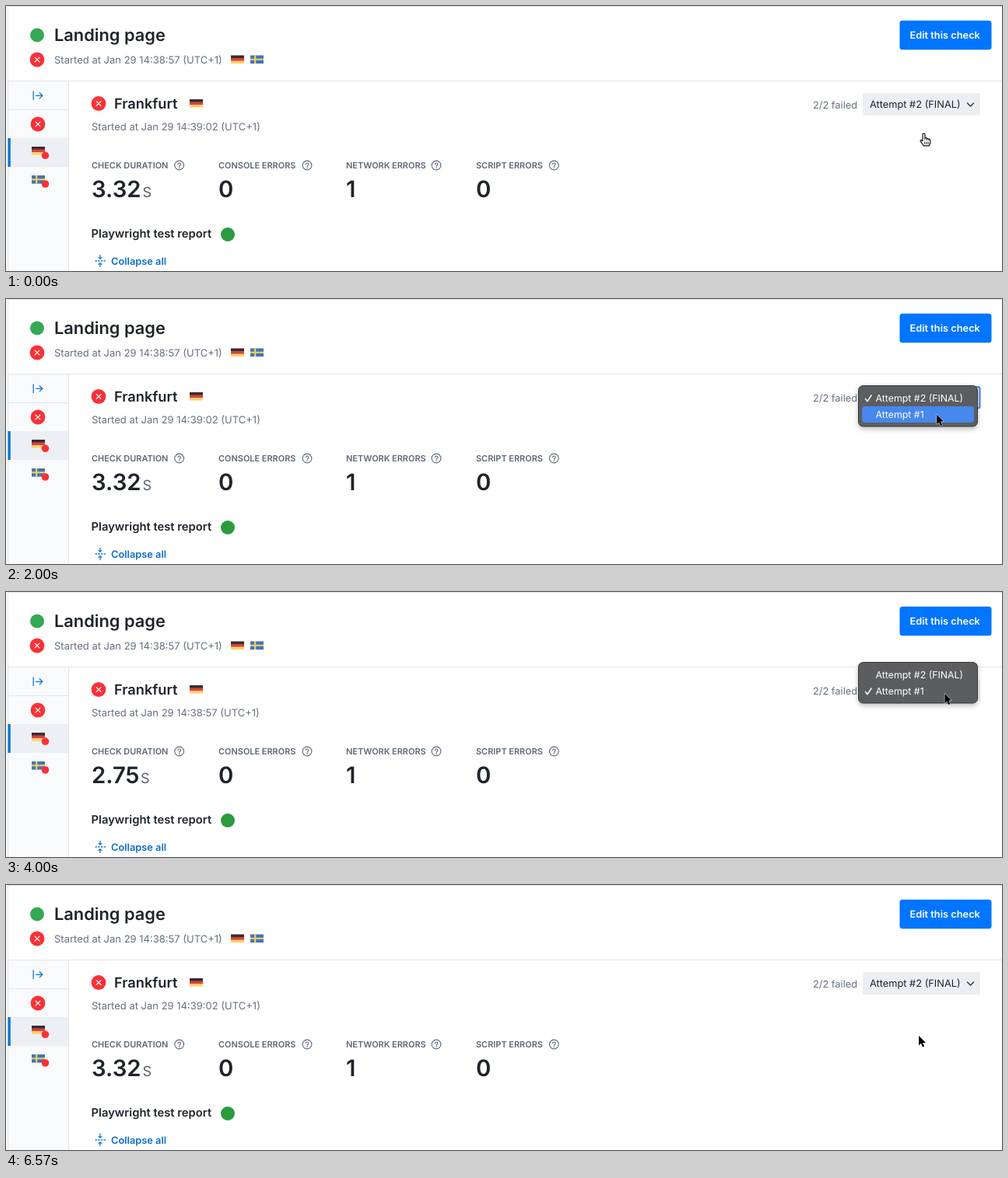
Recreate the animation shown at these times as an HTML page. Size 1280 by 341 pixels, loop 6.86 s.

```html
<!DOCTYPE html>
<html lang="en">
<head>
<meta charset="utf-8">
<title>Check result attempts</title>
<style>
  html, body { margin: 0; width: 100%; height: 100%; overflow: hidden; background: #fff; }
  svg { display: block; width: 100%; height: 100%; }
  text { font-family: Inter, "Open Sans", sans-serif; font-size: 12.8px; fill: #1f242c; white-space: pre; text-rendering: geometricPrecision; }
  .semi { font-weight: 600; }
  .muted { fill: #667080; }
  .date { font-size: 13px; }
  .title { font-size: 21.8px; }
  .city { font-size: 18.2px; }
  .heading { font-size: 14.8px; }
  .label { font-size: 10.95px; font-weight: 600; fill: #5d6878; }
  .number { font-size: 29.3px; font-weight: 600; }
  .unit { font-size: 18.1px; fill: #565f6d; }
  .line { stroke: #e1e5ea; fill: none; }
  .blue { stroke: #0b78d8; fill: none; stroke-width: 1.3; stroke-linecap: round; stroke-linejoin: round; }
  .menu text { font-size: 12.35px; fill: #fff; }
</style>
</head>
<body>
<svg viewBox="0 0 1280 341" preserveAspectRatio="none">
  <defs>
    <g id="fail">
      <circle r="9.4" fill="#fa3136"/>
      <path d="M-2.9-2.9l5.8 5.8M2.9-2.9l-5.8 5.8" stroke="#fff" stroke-width="1.3" stroke-linecap="round"/>
    </g>
    <g id="germany">
      <rect width="17" height="4" fill="#332f30"/>
      <rect y="3.5" width="17" height="4" fill="#dc4040"/>
      <rect y="7.1" width="17" height="3.5" fill="#f8d46a"/>
    </g>
    <g id="sweden">
      <rect width="17" height="10.6" fill="#4474b8"/>
      <path d="M6.2 0v10.6M0 5.3h17" stroke="#f3d35c" stroke-width="2.1"/>
    </g>
    <g id="help">
      <circle r="5.9" fill="none" stroke="#5d6878" stroke-width="1.1"/>
      <path d="M-1.7-1.2c0-2.4 3.5-2.3 3.5 0C1.8.2 0 .2 0 1.6" fill="none" stroke="#5d6878" stroke-width="1.1" stroke-linecap="round"/>
      <circle cy="3.3" r=".75" fill="#5d6878"/>
    </g>
    <path id="tick" d="M0 .5l2.6 3.2L7.6-4" fill="none" stroke="#fff" stroke-width="1.5" stroke-linecap="round" stroke-linejoin="round"/>
    <filter id="shadow" x="-20%" y="-30%" width="140%" height="180%">
      <feDropShadow dx="0" dy="3" stdDeviation="3" flood-opacity=".25"/>
    </filter>
  </defs>

  <rect width="1280" height="341" fill="#fff"/>
  <rect x="3" y="97" width="77" height="244" fill="#f9fafc"/>
  <rect x="3" y="170" width="77" height="37" fill="#eceff4"/>
  <path class="line" d="M2.5 0V341M2 .5H1280M3 96.5H1280M3 133.5H80M80.5 97V341"/>
  <rect x="2.4" y="170" width="3.4" height="37" fill="#0b78d8"/>

  <circle cx="40" cy="37.5" r="9" fill="#34a853"/>
  <text class="semi title" x="62" y="45">Landing page</text>
  <use href="#fail" x="40" y="69"/>
  <text class="muted date" x="62" y="73.5">Started at Jan 29 14:38:57 (UTC+1)</text>
  <use href="#germany" x="289" y="63.5"/>
  <use href="#sweden" x="314" y="63.5"/>
  <rect x="1148.5" y="18.8" width="118" height="37.4" rx="3.5" fill="#0075ff"/>
  <text class="semi" x="1161.5" y="42.3" style="fill:#fff">Edit this check</text>

  <path class="blue" d="M35.2 110v10.5M38.5 115.3h8.2M43.2 111.7l3.6 3.6-3.6 3.6"/>
  <use href="#fail" x="41" y="152"/>
  <use href="#germany" x="33" y="181"/>
  <circle cx="50.5" cy="192.3" r="4.8" fill="#fa3136"/>
  <use href="#sweden" x="33" y="218"/>
  <circle cx="50.5" cy="229" r="4.8" fill="#fa3136"/>

  <use href="#fail" x="119" y="125.5"/>
  <text class="semi city" x="139" y="132.3">Frankfurt</text>
  <use href="#germany" x="236" y="120"/>
  <text class="muted date" x="110" y="160.4" id="started"></text>

  <g id="stats"></g>
  <text class="number" x="110" y="246" id="duration"></text>
  <text class="unit" y="246" id="unit">S</text>

  <text class="semi heading" x="109.5" y="297.8">Playwright test report</text>
  <circle cx="285" cy="294" r="9" fill="#2b9a3d"/>
  <path class="blue" d="M121 320.5v4.7M119 323.4l2 2 2-2M121 335.5v-4.7M119 332.6l2-2 2 2"/>
  <path class="blue" d="M115 328h12.5" stroke-dasharray="1.4 2.3"/>
  <text class="semi" x="135" y="332.5" style="fill:#0b6fd0">Collapse all</text>

  <text class="muted" x="1037" y="131.6">2/2 failed</text>
  <rect x="1101" y="112" width="151" height="29" rx="3" fill="#eceef2"/>
  <rect id="ring" x="1102" y="113" width="149.5" height="27.5" rx="2.5" fill="none" stroke="#3d87ea" stroke-width="2"/>
  <text x="1110" y="131" id="value"></text>
  <path d="M1235.5 125l4 4 4-4" fill="none" stroke="#343a44" stroke-width="1.5" stroke-linecap="round" stroke-linejoin="round"/>

  <g id="menu" class="menu">
    <rect x="1095.5" y=".5" width="153" height="52.5" rx="6" fill="#5b5d5f" stroke="#38393b" filter="url(#shadow)"/>
    <rect id="hover" x="1100" width="144" height="21" rx="4" fill="#4688ec"/>
    <use id="mark" href="#tick" x="1104.5"/>
    <text x="1117.5" y="20.5">Attempt #2 (FINAL)</text>
    <text x="1117.5" y="41.8">Attempt #1</text>
  </g>

  <path id="arrow" d="M-.6.7v12.4l2.8-2.6 2 4.6 2.2-1-2-4.5h3.9z" fill="#000" stroke="#fff" stroke-width="1" stroke-linejoin="round" paint-order="stroke"/>
  <g id="hand" stroke="#111" stroke-width="1.2" stroke-linejoin="round" stroke-linecap="round">
    <path d="M-1.5 1.2a1.5 1.5 0 0 1 3 0V5.5c1-.7 2.3-.3 2.5.6 1-.5 2.1 0 2.3.8 1-.4 2 .2 2 1.2v3.2c0 1.5-1 2.2-1.2 4H-.3c-.6-2.1-2.6-3.4-4-5.8-.6-1.2.6-2 1.6-1.3l1.2 1z" fill="#fff"/>
    <path d="M1.5 5.5v2.2M4 6.1v2M6.3 6.9v1.6M1.3 10.5v2.6M3.5 10.5v2.6M5.7 10.5v2.6" fill="none" stroke-width=".9"/>
  </g>
</svg>

<script>
const LOOP = 6860, STEPS = 48, LAST_STEP = 46;
const $ = id => document.getElementById(id);

// Pointer path: step, x, y
const PATH = [
  [0, 1179.5, 164.5], [2, 1182, 163], [8, 1216, 133], [10, 1217, 132], [12, 1211, 139],
  [15, 1192, 151], [17, 1190, 153], [21, 1188, 157], [27, 1207, 130], [31, 1207, 130],
  [35, 1215, 102], [36, 1215, 102], [39, 1207, 141], [46, 1172, 196]
];

const ATTEMPTS = [
  { name: 'Attempt #2 (FINAL)', started: '14:39:02', duration: '3.32', unitX: 175.5 },
  { name: 'Attempt #1', started: '14:38:57', duration: '2.75', unitX: 173 }
];

const STATS = [
  ['CHECK DURATION', 110, 222.7], ['CONSOLE ERRORS', 273, 387, 0],
  ['NETWORK ERRORS', 437, 553, 1], ['SCRIPT ERRORS', 604, 704.3, 0]
];

$('stats').innerHTML = STATS.map(([label, x, helpX, count]) =>
  `<text class="label" x="${x}" y="209">${label}</text>
   <use href="#help" x="${helpX}" y="205"/>
   <text class="number" x="${x}" y="246">${count ?? ''}</text>`).join('');

const within = (step, from, to) => step >= from && step < to;
const show = (id, visible) => $(id).setAttribute('visibility', visible ? 'visible' : 'hidden');
const move = (id, x, y) => $(id).setAttribute('transform', `translate(${x} ${y})`);

function pointerAt(step) {
  const i = Math.max(1, PATH.findIndex(p => p[0] >= step));
  const [s0, x0, y0] = PATH[i - 1], [s1, x1, y1] = PATH[i];
  const k = (1 - Math.cos(Math.PI * (step - s0) / (s1 - s0))) / 2;
  return [x0 + (x1 - x0) * k, y0 + (y1 - y0) * k];
}

function render(step) {
  const [x, y] = pointerAt(step);
  const selected = within(step, 18, 38) ? 1 : 0;
  const attempt = ATTEMPTS[selected];
  $('started').textContent = `Started at Jan 29 ${attempt.started} (UTC+1)`;
  $('duration').textContent = attempt.duration;
  $('unit').setAttribute('x', attempt.unitX);
  $('value').textContent = attempt.name;

  const open = within(step, 9, 17) || within(step, 28, 37);
  const top = selected ? 90 : 111;
  const item = y < top + 27 ? 0 : 1;
  show('ring', within(step, 10, 18) || within(step, 29, 38));
  show('menu', open);
  move('menu', 0, top);
  show('hover', open && step !== 9 && step !== 28);
  $('hover').setAttribute('y', 6 + 21 * item);
  $('mark').setAttribute('y', 17 + 21 * selected);

  const hand = step < 9 || (within(step, 22, 28) && y < 141);
  show('hand', hand);
  show('arrow', !hand);
  move(hand ? 'hand' : 'arrow', x, y);
}

let shown = -1;
function tick() {
  const time = performance.now() % LOOP;
  const step = Math.min(LAST_STEP, Math.floor((time + 3) * STEPS / LOOP));
  if (step !== shown) render(shown = step);
  requestAnimationFrame(tick);
}
tick();
</script>
</body>
</html>
```
